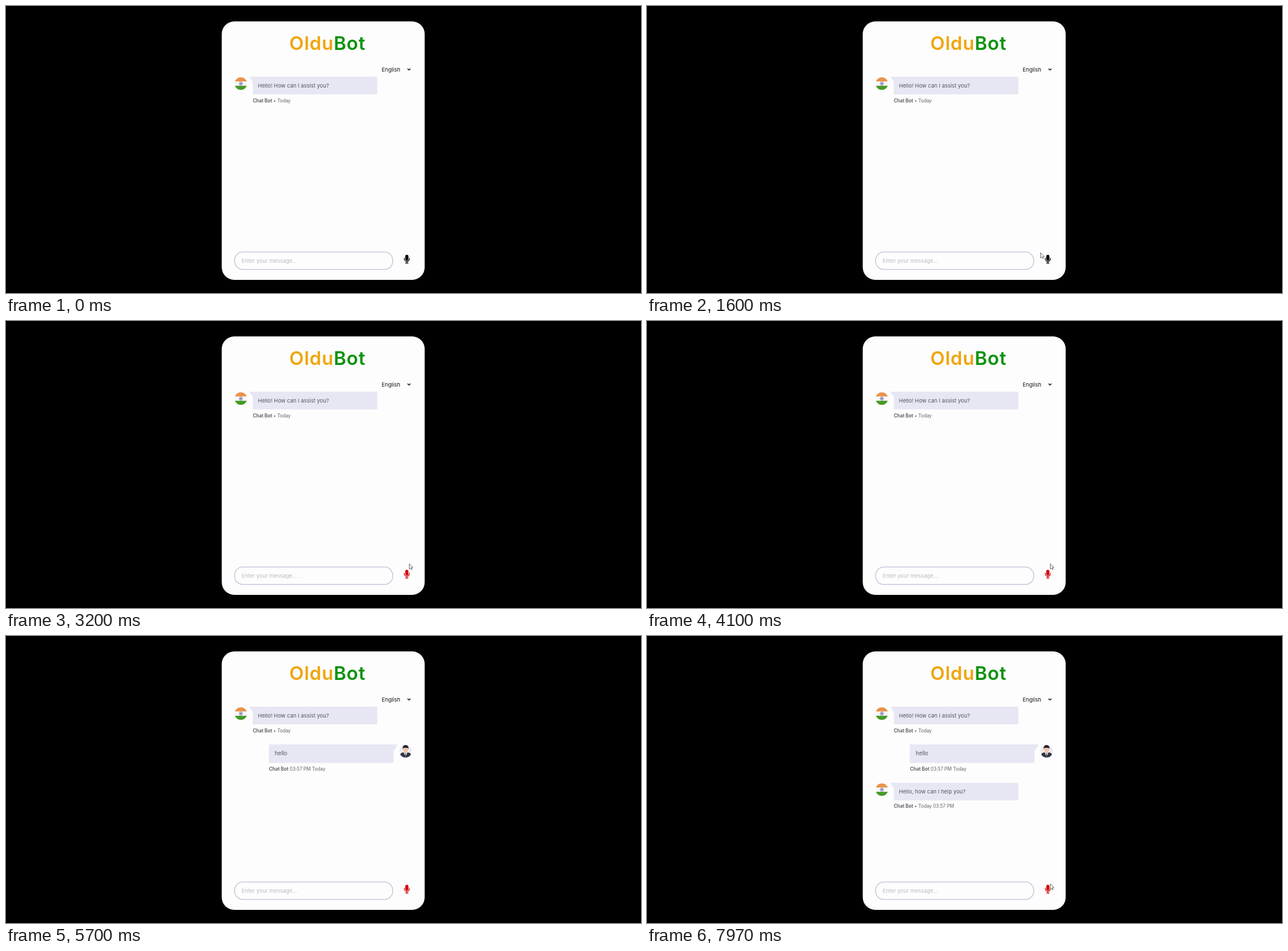
An HTML page for the animation above (8000 ms loop, 1114x503 px).

```html
<!DOCTYPE html>
<html lang="en">
<head>
<meta charset="utf-8">
<title>Chat bot</title>
<style>
  html, body { margin: 0; width: 100%; height: 100%; overflow: hidden; background: #000; }
  svg { display: block; font: 9.45px Inter, "Open Sans", sans-serif; }
  .title { font-size: 33px; font-weight: 600; letter-spacing: .8px; }
  .message { fill: #55555c; }
  .caption { font-size: 8.3px; fill: #66666b; letter-spacing: -.08px; }
  .caption tspan { font-weight: 600; fill: #55555b; }
  .bubble { fill: #e7e7f4; }
  .cursor { fill: #fff; stroke: #55555c; stroke-width: .9; stroke-linejoin: round; }
</style>
</head>
<body>
<svg width="1114" height="503" viewBox="0 0 1114 503">
  <defs>
    <clipPath id="round"><circle r="11"/></clipPath>
    <g id="flag" clip-path="url(#round)">
      <rect x="-11" y="-11" width="22" height="22" fill="#f7f7f7"/>
      <rect x="-11" y="-11" width="22" height="7.2" fill="#e9924a"/>
      <rect x="-11" y="3.8" width="22" height="7.2" fill="#459a26"/>
      <circle r="2.9" fill="#dcdcec" stroke="#6c6ca4" stroke-width=".8"/>
      <circle r="1.2" fill="#55558f"/>
    </g>
    <g id="person" clip-path="url(#round)">
      <circle r="11" fill="#ececf0"/>
      <path d="M-10 11v-3q0-5 6-6h8q6 1 6 6v3z" fill="#2f3347"/>
      <path d="M-3.2 2h6.4L0 10z" fill="#fff"/>
      <path d="M-.8 4h1.6L1 9l-1 2-1-2z" fill="#6d5260"/>
      <path d="M-2 0h4v3L0 5-2 3z" fill="#e2a98f"/>
      <ellipse cy="-3" rx="4.2" ry="5.2" fill="#f2c3aa"/>
      <path d="M-5-3q-1-8 5-8t5 8l-1-3q-4 0-8 0z" fill="#25232b"/>
    </g>
    <g id="botBubble">
      <path class="bubble" d="M427 0h222.500q2 0 2 2v27q0 2-2 2H433V9z"/>
      <circle cx="412" cy="12" r="18.500" fill="#fdfdfd"/>
      <use href="#flag" x="412" y="12"/>
    </g>
  </defs>

  <rect x="378.500" y="27" width="356" height="453" rx="22" fill="#fdfdfd"/>
  <text class="title" x="497" y="77" fill="#f0a50f">Oldu</text>
  <text class="title" x="575" y="77" fill="#0b920d">Bot</text>
  <text x="659" y="114.500" font-size="9.600" fill="#151515">English</text>
  <path d="M704.500 109.800l2.500 2.500 2.500-2.500" fill="none" stroke="#111" stroke-width="1.500"/>

  <use href="#botBubble" y="124"/>
  <text class="message" x="442" y="142.500">Hello! How can I assist you?</text>
  <text class="caption" x="433" y="168.500"><tspan>Chat Bot</tspan> • Today</text>

  <g id="question">
    <path class="bubble" d="M461 190h227l-8 11v21.500H461z"/>
    <circle cx="701" cy="202" r="18" fill="#fdfdfd"/>
    <use href="#person" x="701" y="202"/>
    <text class="message" x="471.500" y="209" font-size="9.700">hello</text>
    <text class="caption" x="461.500" y="235.700"><tspan>Chat Bot</tspan> 03:57 PM Today</text>
  </g>

  <g id="answer">
    <use href="#botBubble" y="257.300"/>
    <text class="message" x="442" y="275.700">Hello, how can I help you?</text>
    <text class="caption" x="433" y="301.300"><tspan>Chat Bot</tspan> • Today 03:57 PM</text>
  </g>

  <rect x="401" y="431.200" width="277.500" height="30.500" rx="14.500" fill="#fdfdfd" stroke="#c0bfd7" stroke-width="1.300"/>
  <text x="413.500" y="449.800" fill="#b9b8c6">Enter your message...</text>

  <g id="mic">
    <rect x="700.400" y="436" width="5.600" height="10" rx="2.800"/>
    <path d="M698.700 441.500v1.500a4.500 4.500 0 0 0 9 0v-1.500M703.200 447.500v3M700.500 450.500h5.400" fill="none" stroke="currentColor" stroke-width="1.300"/>
  </g>

  <g id="pointer" class="cursor">
    <path id="arrow" d="M.5.500v9.300l2.200-2 1.500 3 1.300-.6-1.400-3h2.900z"/>
    <path id="hand" d="M2 6V1.300q0-1 .9-1t.9 1v3.400q1-.6 1.500.3 1-.5 1.400.4 1.200-.3 1.200.9v2.500q0 3-2.500 3.500H3.200Q2.500 10.500.4 8q-.4-1.500.8-1.200L2 7.500z"/>
  </g>
</svg>
<script>
  const LOOP = 8000;
  const el = id => document.getElementById(id);
  const [question, answer, mic, pointer, arrow, hand] =
    ["question", "answer", "mic", "pointer", "arrow", "hand"].map(el);

  // Pointer stops: time, x, y
  const stops = [
    [1300, 655, 420], [1600, 690, 432], [1900, 706, 430], [2700, 706, 430],
    [3000, 707, 425], [4700, 707, 425], [7600, 709, 440], [7850, 707, 434], [LOOP, 707, 434]
  ];

  const show = (node, visible) => node.style.display = visible ? "" : "none";
  const within = (t, from, to) => t >= from && t < to;

  function pointerAt(t) {
    const i = Math.max(1, stops.findIndex(s => s[0] > t));
    const [t0, x0, y0] = stops[i - 1], [t1, x1, y1] = stops[i];
    const p = Math.min(1, Math.max(0, (t - t0) / (t1 - t0)));
    const ease = p * p * (3 - 2 * p);
    return [x0 + (x1 - x0) * ease, y0 + (y1 - y0) * ease];
  }

  function render(now) {
    const t = now % LOOP;
    const overMic = within(t, 1780, 2800);
    show(question, t >= 4700);
    show(answer, t >= 6300);
    show(pointer, within(t, 1300, 4700) || t >= 7600);
    show(hand, overMic);
    show(arrow, !overMic);
    pointer.setAttribute("transform", `translate(${pointerAt(t)})`);
    mic.style.color = mic.style.fill = t >= 2100 ? "#d10a10" : "#050505";
    requestAnimationFrame(render);
  }
  requestAnimationFrame(render);
</script>
</body>
</html>
```
